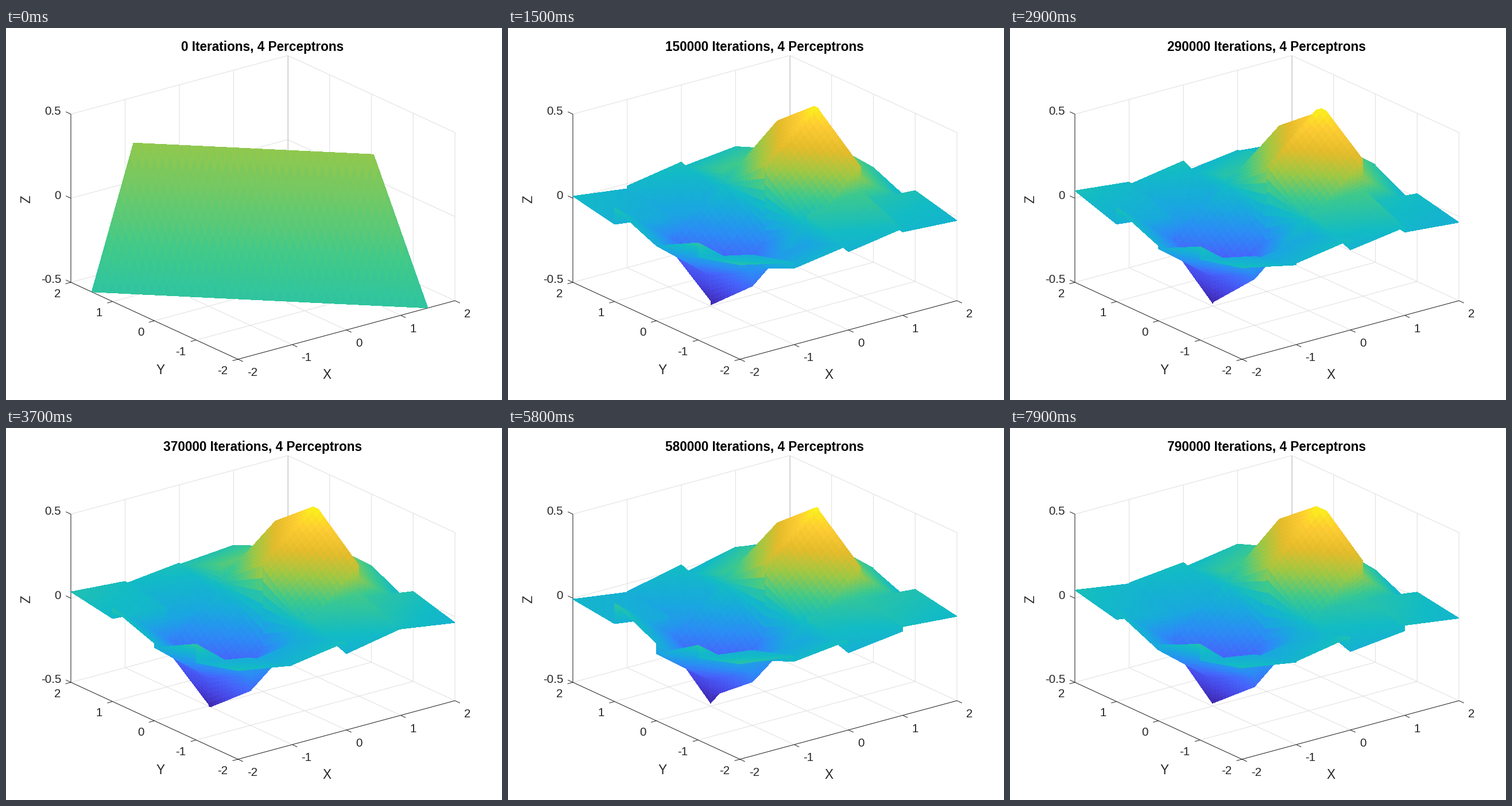
A matplotlib script for the animation above (8000 ms loop, 864 px wide and 648 px high).

```python
import numpy as np
import matplotlib.pyplot as plt
from matplotlib.animation import FuncAnimation
from matplotlib.collections import LineCollection, PolyCollection
from matplotlib.colors import LinearSegmentedColormap

W, H, DPI = 864, 648, 72
FRAMES, STEP = 80, 100
SUB, GAP = 12, 6              # facets along a cell side, and up a step
ZPX = 293                     # pixels per unit of z
CELLS = range(-2, 2)
INK, GRID, EDGE = "#262626", "#dfdfdf", "#c4c4c4"

parula = LinearSegmentedColormap.from_list("parula", [
    "#3e26a8", "#4745e3", "#4566fb", "#2b8cf5", "#19a8de", "#12bbc4",
    "#3fc98b", "#9cc845", "#e3bb2b", "#fecc33", "#f9fb15"])


def project(x, y, z):
    """Orthographic view of the box, in stage pixels."""
    return np.stack([404 + 94.5 * (x + 2) - 72.75 * (y + 2),
                     577 - 25.5 * (x + 2) - 33.5 * (y + 2) - ZPX * (z + .5)],
                    axis=-1)


def line_fit(f, k):
    """Mean and slope of the best line through f on [k, k + 1]."""
    t = (np.arange(200) + .5) / 200 - .5
    v = f(k + .5 + t)
    return v.mean(), 12 * (v * t).mean()


FIT_X = [line_fit(lambda x: x * np.exp(-x * x), k) for k in CELLS]
FIT_Y = [line_fit(lambda y: np.exp(-y * y), k) for k in CELLS]

# Cells share borders but not heights, so SPLIT adds samples up each step
M = SUB + 1
T = np.linspace(-.5, .5, M)
INDEX = np.concatenate([np.r_[k * M + np.arange(SUB),
                              k * M + SUB + np.arange(GAP) / GAP]
                        for k in range(4)])[:1 - GAP]
SPLIT = np.array([np.interp(INDEX, np.arange(4 * M), row)
                  for row in np.eye(4 * M)]).T
COORD = SPLIT @ np.concatenate([k + .5 + T for k in CELLS])
GX, GY = np.meshgrid(COORD, COORD, indexing="ij")


def heights(k):
    """One learned plane per cell, shaken by the training noise."""
    rng = np.random.default_rng(100 + k)
    amp = 4 * (1 + 2 * .6 ** k) / ZPX
    z = np.empty((4 * M, 4 * M))
    for i, (mx, sx) in enumerate(FIT_X):
        for j, (my, sy) in enumerate(FIT_Y):
            a, b, c = np.array([mx * my, sx * my, mx * sy]) + amp * rng.normal(size=3)
            a += 12 / ZPX * np.exp(-(i - 2) ** 2 - (j - 2) ** 2)
            z[i * M:(i + 1) * M, j * M:(j + 1) * M] = a + b * T[:, None] + c * T
    start = .3 ** k
    return (1 - start) * SPLIT @ z @ SPLIT.T - start * (GX + GY + 1)


def clip(poly):
    """Cut a polygon to -0.5 <= z <= 0.5."""
    for s in (1, -1):
        out = []
        for p, q in zip(poly, list(poly[1:]) + [poly[0]]):
            dp, dq = .5 - s * p[2], .5 - s * q[2]
            if dp >= 0:
                out.append(p)
            if dp * dq < 0:
                out.append(p + (q - p) * dp / (dp - dq))
        poly = out
    return np.array(poly)


def facets(z):
    """Projected facets and their colours, far to near."""
    pts = np.stack([GX, GY, z], axis=-1)[::-1, ::-1]
    quads = np.stack([pts[:-1, :-1], pts[1:, :-1], pts[1:, 1:], pts[:-1, 1:]],
                     axis=2).reshape(-1, 4, 3)
    lo, hi = quads[..., 2].min(1), quads[..., 2].max(1)
    seen = (hi > -.5) & (lo < .5)
    quads, cut = quads[seen], ((hi > .5) | (lo < -.5))[seen]
    verts = list(project(*np.moveaxis(quads, -1, 0)))
    mid = quads[..., 2].mean(1).clip(-.5, .5)
    for n in np.flatnonzero(cut):
        poly = clip(quads[n])
        if len(poly) > 2:
            verts[n] = project(*poly.T)
            mid[n] = poly[:, 2].mean()
    return verts, parula((mid - z.min()) / (z.max() - z.min()))


plt.rcParams["font.family"] = "Liberation Sans"
fig = plt.figure(figsize=(W / DPI, H / DPI), dpi=DPI, facecolor="white")
ax = fig.add_axes([0, 0, 1, 1])
ax.set_xlim(0, W)
ax.set_ylim(H, 0)
ax.axis("off")


def lines(paths, color, zorder):
    segs = [[project(*map(np.float64, p)) for p in path] for path in paths]
    ax.add_collection(LineCollection(segs, colors=color, linewidths=1,
                                     zorder=zorder))


def label(x, y, s, ha, size=20.5, **kw):
    return ax.text(x, y, s, ha=ha, va="baseline", fontsize=size,
                   **{"color": INK, **kw})


grid = []
for t in range(-2, 3):
    grid += [[(t, -2, -.5), (t, 2, -.5), (t, 2, .5)],
             [(-2, t, -.5), (2, t, -.5), (2, t, .5)]]
for h in (0, .5):
    grid.append([(-2, 2, h), (2, 2, h), (2, -2, h)])
lines(grid, GRID, 0)
lines([[(2, 2, -.5), (2, 2, .5)]], EDGE, .5)
lines([[(-2, 2, .5), (-2, 2, -.5), (-2, -2, -.5), (2, -2, -.5)]], INK, 1)

ticks = []
for t in range(-2, 3):
    ticks += [[(t, -2, -.5), (t, -2.12, -.5)], [(-2, t, -.5), (-2.1, t, -.5)]]
    x, y = project(t, -2, -.5)
    label(x + 16, y + 29, str(t), "left")
    x, y = project(-2, t, -.5)
    label(x - 18, y + 26, str(t), "right")
for h in (-.5, 0, .5):
    ticks.append([(-2, 2, h), (-2, 2.12, h)])
    x, y = project(-2, 2, h)
    label(x - 17, y + 1, f"{h:g}", "right")
lines(ticks, INK, 1)

label(559, 611, "X", "center", 22.6)
label(269, 603, "Y", "center", 22.6)
label(47, 298, "Z", "center", 22.6, rotation=90).set(ha="right", va="center")
title = label(447, 40, "", "center", 22.6, fontweight="bold", color="black")

surface = PolyCollection([], edgecolors="none", linewidths=0,
                         antialiaseds=False, zorder=2)
ax.add_collection(surface, autolim=False)


def draw(k):
    verts, colors = facets(heights(k))
    surface.set_verts(verts)
    surface.set_facecolor(colors)
    title.set_text(f"{k * 10000} Iterations, 4 Perceptrons")
    return surface, title


anim = FuncAnimation(fig, draw, frames=FRAMES, interval=STEP, repeat=True,
                     repeat_delay=0, blit=False)
plt.show()
```
